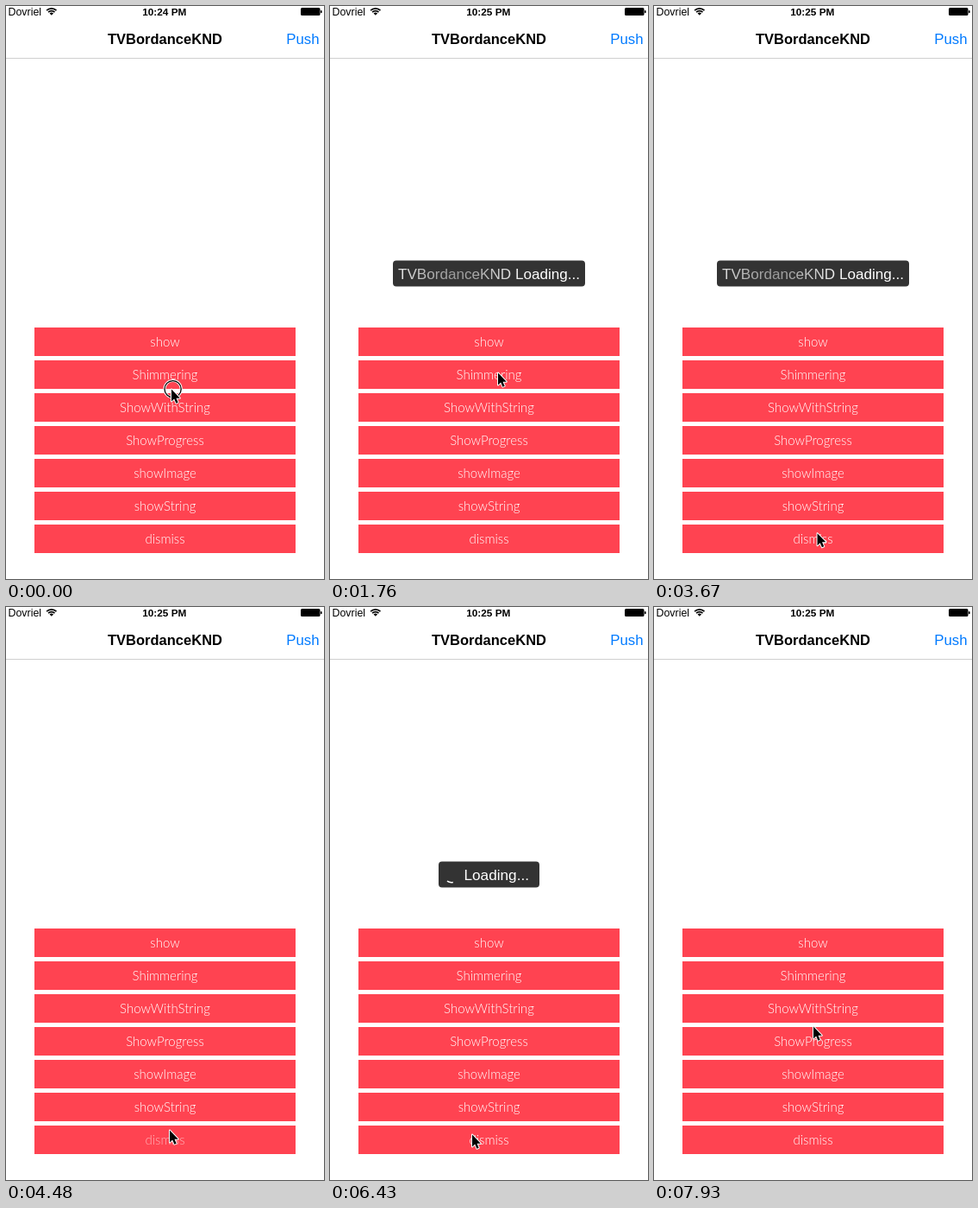
Write an HTML page with a canvas that moves like this. It is 369x663 px and loops after 7990 ms.

```html
<!DOCTYPE html>
<html lang="en">
<head>
<meta charset="utf-8">
<title>HUD demo</title>
<style>
  html, body { margin: 0; width: 100%; height: 100%; overflow: hidden; background: #fff; }
  canvas { display: block; width: 369px; height: 663px; }
</style>
</head>
<body>
<canvas id="stage"></canvas>
<script>
const W = 369, H = 663, LOOP = 7990;
const SANS = '"Liberation Sans", Arial, sans-serif';
const LABEL_FONT = '300 15px Lato, sans-serif';
const APP = 'TVBordanceKND';
const LABELS = ['show', 'Shimmering', 'ShowWithString', 'ShowProgress',
                'showImage', 'showString', 'dismiss'];

// Button presses: label index, touch down, touch up
const PRESSES = [
  { label: -1, down: -100, up: 60 },
  { label: 1, down: 500, up: 610 },
  { label: 6, down: 4200, up: 4340 },
  { label: 2, down: 5120, up: 5200 },
  { label: 6, down: 7130, up: 7260 }
];

const HUDS = [
  { show: 590, hide: 4330, width: 223, draw: drawShimmerText },
  { show: 5180, hide: 7250, width: 117, draw: drawLoading }
];

// Pointer path: time, x, y
const PATH = [
  [0, 192, 443], [60, 192, 442], [260, 195, 424], [1880, 195, 424],
  [2450, 178, 572], [2680, 183, 621], [2850, 182, 666], [3080, 184, 666],
  [3720, 190, 605], [4490, 190, 605], [4590, 190, 491], [4880, 204, 456],
  [5310, 204, 456], [5460, 190, 497], [5910, 184, 550], [6430, 165, 610],
  [6700, 164, 613], [7530, 164, 613], [7750, 192, 545], [7930, 185, 485]
];

const canvas = document.getElementById('stage');
const ctx = canvas.getContext('2d');
const ratio = window.devicePixelRatio || 1;
canvas.width = W * ratio;
canvas.height = H * ratio;

const clamp = v => Math.min(1, Math.max(0, v));
const mix = (a, b, k) => a + (b - a) * k;
const smooth = v => { v = clamp(v); return v * v * (3 - 2 * v); };

function text(str, x, y, font, color, align = 'center') {
  ctx.font = font;
  ctx.fillStyle = color;
  ctx.textAlign = align;
  ctx.fillText(str, x, y);
}

function pointerAt(t) {
  const i = PATH.findIndex(p => p[0] > t);
  if (i < 0) return PATH[PATH.length - 1].slice(1);
  const [t0, x0, y0] = PATH[i - 1], [t1, x1, y1] = PATH[i];
  const k = (t - t0) / (t1 - t0);
  return [mix(x0, x1, k), mix(y0, y1, k)];
}

function drawWifi(x, y) {
  ctx.strokeStyle = ctx.fillStyle = '#000';
  ctx.lineWidth = 1.7;
  const from = -Math.PI * 0.75, to = -Math.PI * 0.25;
  for (const r of [5.2, 8]) {
    ctx.beginPath();
    ctx.arc(x, y, r, from, to);
    ctx.stroke();
  }
  ctx.beginPath();
  ctx.moveTo(x, y);
  ctx.arc(x, y, 3.2, from, to);
  ctx.fill();
}

function drawBars(t) {
  text('Dovriel', 2.5, 11, '12.4px ' + SANS, '#000', 'left');
  drawWifi(52.8, 10.8);
  text(t < 1500 ? '10:24 PM' : '10:25 PM', 183.8, 11, 'bold 11.8px ' + SANS, '#000');
  ctx.fillStyle = '#000';
  ctx.beginPath();
  ctx.roundRect(342, 2, 22.5, 9, 1.5);
  ctx.roundRect(365, 5, 1.6, 3.2, 0.8);
  ctx.fill();

  text(APP, 184.5, 44, 'bold 16.5px ' + SANS, '#000');
  text('Push', 363.5, 44, '16.8px ' + SANS, '#007aff', 'right');
  ctx.fillStyle = '#cfcfcf';
  ctx.fillRect(0, 60, W, 1);
}

function labelAlpha(index, t) {
  let alpha = 1;
  for (const p of PRESSES) {
    if (p.label === index && t >= p.down) {
      alpha = Math.min(alpha, mix(0.2, 1, clamp((t - p.up) / 290)));
    }
  }
  return alpha;
}

function drawButtons(t) {
  LABELS.forEach((label, i) => {
    const y = 372 + i * 38;
    ctx.fillStyle = '#ff4351';
    ctx.fillRect(33, y, 303, 33);
    ctx.globalAlpha = labelAlpha(i, t);
    text(label, 184.5, y + 22, LABEL_FONT, '#fff');
    ctx.globalAlpha = 1;
  });
}

// HUD contents are drawn around the HUD centre.
function drawShimmerText(t) {
  const band = 190;
  const lead = -106 + 0.235 * (((t - 1070) % 1940 + 1940) % 1940);
  let fill = '#fff';
  if (t >= 1070) {
    fill = ctx.createLinearGradient(lead - band, 0, lead, 0);
    for (let i = 0; i <= 8; i++) {
      const dim = 0.5 * Math.sin(Math.PI * i / 8) ** 2;
      fill.addColorStop(i / 8, `rgba(255,255,255,${1 - dim})`);
    }
  }
  text(APP + ' Loading...', 0, 6.3, '17.1px ' + SANS, fill);
}

function drawLoading(t) {
  text('Loading...', -29, 6.3, '17.2px ' + SANS, '#fff', 'left');
  const age = Math.max(0, t - 5060) / 1000;
  const phase = age % 1.5;
  const turn = Math.PI * 2;
  const close = smooth((phase - 1) / 0.5);
  const start = 0.25 * smooth(phase) + 0.75 * close;
  const end = smooth(phase);
  const spin = age / 4 * turn;
  ctx.strokeStyle = '#fff';
  ctx.lineWidth = 1.5;
  ctx.beginPath();
  ctx.arc(-43.5, 0, 9.2, spin + start * turn, spin + end * turn);
  ctx.stroke();
}

function drawHud(hud, t) {
  const shown = clamp((t - hud.show) / 180);
  const hidden = clamp((t - hud.hide) / 130);
  if (shown === 0 || hidden === 1) return;
  const easeOut = 1 - (1 - shown) ** 2;
  const scale = mix(1.2, 1, easeOut) * mix(1, 0.8, hidden);
  ctx.save();
  ctx.translate(184.5, 309.5);
  ctx.scale(scale, scale);
  ctx.globalAlpha = easeOut * (1 - hidden);
  ctx.fillStyle = '#333';
  ctx.beginPath();
  ctx.roundRect(-hud.width / 2, -15, hud.width, 30, 4);
  ctx.fill();
  hud.draw(t);
  ctx.restore();
}

function drawPointer(t) {
  const [x, y] = pointerAt(t);
  ctx.save();
  ctx.translate(x, y);
  if (PRESSES.some(p => t >= p.down && t < p.up)) {
    ctx.beginPath();
    ctx.arc(1.6, 0.2, 9.6, 0, Math.PI * 2);
    ctx.strokeStyle = '#fff';
    ctx.lineWidth = 3;
    ctx.stroke();
    ctx.strokeStyle = '#000';
    ctx.lineWidth = 1.3;
    ctx.stroke();
  }
  ctx.beginPath();
  ctx.moveTo(0, 0.5);
  ctx.lineTo(0, 14.5);
  ctx.lineTo(3.2, 11.5);
  ctx.lineTo(5.4, 16.7);
  ctx.lineTo(7.7, 15.7);
  ctx.lineTo(5.5, 10.7);
  ctx.lineTo(9.8, 10.7);
  ctx.closePath();
  ctx.lineJoin = 'round';
  ctx.strokeStyle = '#fff';
  ctx.lineWidth = 2;
  ctx.stroke();
  ctx.fillStyle = '#000';
  ctx.fill();
  ctx.restore();
}

function render(t) {
  ctx.setTransform(ratio, 0, 0, ratio, 0, 0);
  ctx.fillStyle = '#fff';
  ctx.fillRect(0, 0, W, H);
  drawBars(t);
  drawButtons(t);
  HUDS.forEach(hud => drawHud(hud, t));
  drawPointer(t);
}

const began = performance.now();
function tick() {
  render((performance.now() - began) % LOOP);
  requestAnimationFrame(tick);
}
tick();
</script>
</body>
</html>
```
